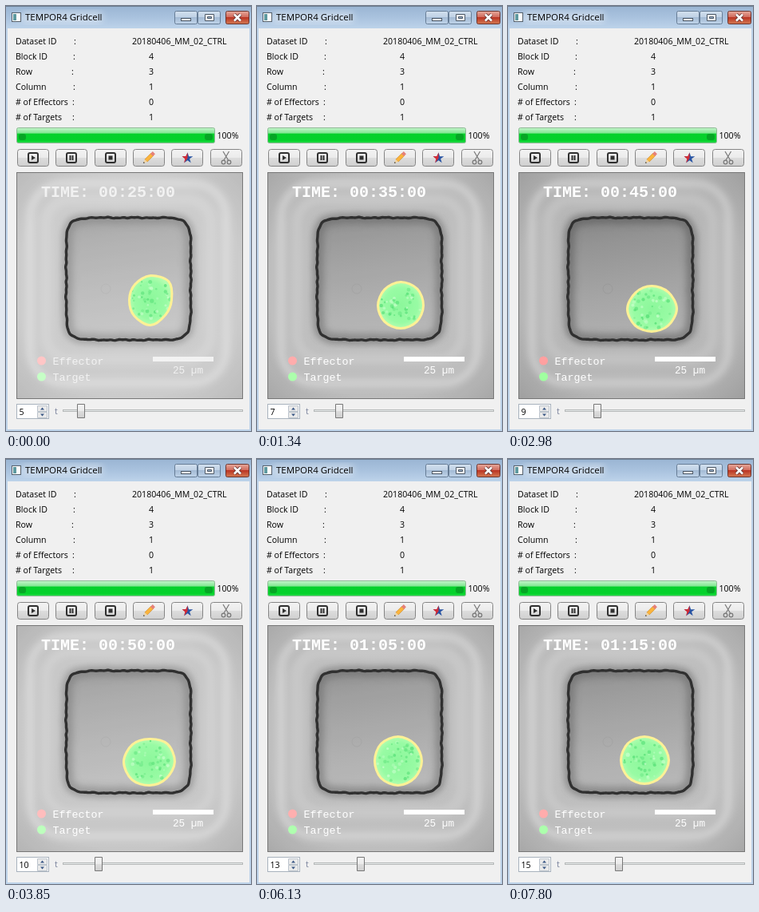
Write an HTML page that moves like this. It is 307x532 px and loops after 8000 ms.

```html
<!DOCTYPE html>
<html lang="en">
<head>
<meta charset="utf-8">
<title>Well viewer</title>
<style>
html, body { margin: 0; width: 100%; height: 100%; overflow: hidden; background: #f0f0f0; }
svg { display: block; width: 100%; height: 100%; }
.ui { font: 10.6px "Open Sans", "Noto Sans", sans-serif; fill: #000; }
.mono { font-family: "Liberation Mono", monospace; fill: #fff; }
.light { mix-blend-mode: soft-light; }
.icon { fill: none; stroke: #303030; stroke-width: 2; }
</style>
</head>
<body>
<svg viewBox="0 0 307 532" preserveAspectRatio="none">
  <defs>
    <linearGradient id="title" x2="0" y2="1">
      <stop offset="0" stop-color="#9ab5d3"/><stop offset=".5" stop-color="#a9c2de"/><stop offset="1" stop-color="#bdd3ea"/>
    </linearGradient>
    <linearGradient id="glass" x2="0" y2="1">
      <stop offset="0" stop-color="#d3e0ee"/><stop offset=".48" stop-color="#bfd1e5"/><stop offset=".5" stop-color="#a4bbd5"/><stop offset="1" stop-color="#c0d4e9"/>
    </linearGradient>
    <linearGradient id="close" x2="0" y2="1">
      <stop offset="0" stop-color="#e6a99c"/><stop offset=".48" stop-color="#d0695a"/><stop offset=".5" stop-color="#bb3524"/><stop offset="1" stop-color="#d47a52"/>
    </linearGradient>
    <linearGradient id="button" x2="0" y2="1">
      <stop offset="0" stop-color="#f3f3f3"/><stop offset=".49" stop-color="#ebebeb"/><stop offset=".5" stop-color="#dddddd"/><stop offset="1" stop-color="#cfcfcf"/>
    </linearGradient>
    <linearGradient id="bar" x2="0" y2="1">
      <stop offset="0" stop-color="#c4f5cb"/><stop offset=".36" stop-color="#7ee68f"/><stop offset=".38" stop-color="#06d02c"/><stop offset=".85" stop-color="#04d22b"/><stop offset="1" stop-color="#2fdc50"/>
    </linearGradient>
    <radialGradient id="field" cx=".5" cy=".5" r=".72">
      <stop offset="0" stop-color="#bcbcbc"/><stop offset=".7" stop-color="#b6b6b6"/><stop offset="1" stop-color="#9e9e9e"/>
    </radialGradient>
    <linearGradient id="floor" x2=".15" y2="1">
      <stop offset="0" stop-color="#858585"/><stop offset=".25" stop-color="#949494"/><stop offset=".7" stop-color="#a6a6a6"/><stop offset="1" stop-color="#b0b0b0"/>
    </linearGradient>
    <radialGradient id="body">
      <stop offset="0" stop-color="#8cf79b"/><stop offset=".75" stop-color="#98fba4"/><stop offset="1" stop-color="#b4fdb0"/>
    </radialGradient>
    <filter id="soft" x="-20%" y="-20%" width="140%" height="140%"><feGaussianBlur stdDeviation="4.500"/></filter>
    <filter id="edge"><feGaussianBlur stdDeviation=".7"/></filter>
    <clipPath id="frame"><rect x="14" y="209" width="282" height="282"/></clipPath>
    <clipPath id="inside"><path class="well"/></clipPath>
    <clipPath id="membrane"><path class="cell"/></clipPath>
  </defs>

  <rect width="307" height="532" fill="#bdd3ea"/>
  <rect width="307" height="28" fill="url(#title)"/>
  <path d="M0 .5H307" stroke="#6d7f92"/>
  <rect x="18" y="7" width="104" height="14" rx="7" fill="#fff" opacity=".4" filter="url(#soft)"/>
  <rect x="2" y="28" width="303" height="502" fill="#f0f0f0"/>
  <rect x="7.500" y="8.500" width="11" height="11" fill="#fff" stroke="#56616c"/>
  <path d="M9 10h4v8h-4z" fill="#5f9aa0"/>
  <text x="24" y="18" class="ui" style="font-size:11.500px">TEMPOR4 Gridcell</text>
  <g stroke="#667c95">
    <rect x="211.500" y="6.500" width="28" height="16" rx="2" fill="url(#glass)"/>
    <rect x="240.500" y="6.500" width="28" height="16" rx="2" fill="url(#glass)"/>
    <rect x="275.500" y="6.500" width="29" height="16" rx="2" fill="url(#close)" stroke="#6c3630"/>
  </g>
  <g fill="#fff" stroke="#4a5664">
    <rect x="219.500" y="15.500" width="12" height="3"/>
    <path d="M249.500 10.500h11v8h-11zM252.500 13.500h5v2h-5z" fill-rule="evenodd"/>
  </g>
  <path d="M286 10.500l8 8m0-8l-8 8" stroke="#683a38" stroke-width="4.500"/>
  <path d="M286 10.500l8 8m0-8l-8 8" stroke="#fff" stroke-width="2.500"/>

  <g id="rows" class="ui"></g>

  <rect x="13.500" y="152.500" width="248" height="19" rx="2" fill="url(#bar)" stroke="#8fb996"/>
  <g fill="#087d20" opacity=".5" filter="url(#edge)">
    <rect x="16" y="160" width="9" height="8" rx="3"/><rect x="249" y="160" width="10" height="8" rx="3"/>
  </g>
  <text x="264.500" y="166" class="ui">100%</text>

  <g id="buttons" fill="url(#button)" stroke="#858585"></g>
  <g class="icon">
    <rect x="28" y="184" width="12" height="12" rx="2"/>
    <rect x="76" y="184" width="12" height="12" rx="2"/>
    <rect x="125" y="184" width="12" height="12" rx="2"/>
    <path d="M80.500 187v6m3-6v6"/>
  </g>
  <path d="M32 187l5 3l-5 3zM128.500 187.500h5v5h-5z" fill="#303030"/>
  <g transform="translate(179 190) rotate(-45)">
    <path d="M-5-2.200H6V2.200H-5z" fill="#fbb43c" stroke="#c98524" stroke-width=".6"/>
    <path d="M5-2.200H9V2.200H5z" fill="#e58078"/>
    <path d="M-5-2.200L-10 0L-5 2.200z" fill="#f3d5a1"/><path d="M-8-1L-10 0L-8 1z" fill="#333"/>
  </g>
  <path id="star" fill="#2954a3"/>
  <path d="M227.500 190.500l-4.300 6l1-5.200l-3.700-3l4.700-.3l2.300-4.500z" fill="#d32c36"/>
  <g fill="none" stroke="#777" stroke-width="1.200">
    <path d="M272 182l6.500 11m1-11l-6.500 11"/><circle cx="272.500" cy="195.500" r="2.300"/><circle cx="279.500" cy="195.500" r="2.300"/>
  </g>

  <rect x="13.500" y="208.500" width="283" height="283" fill="#aaa" stroke="#777"/>
  <g clip-path="url(#frame)">
    <g style="isolation:isolate">
      <rect x="14" y="209" width="282" height="282" fill="url(#field)"/>
      <g fill="none" filter="url(#soft)">
        <rect x="30" y="222" width="246" height="250" rx="42" stroke="#e4e4e4" stroke-width="9" opacity=".5"/>
        <rect x="50" y="242" width="207" height="200" rx="30" stroke="#d8d8d8" stroke-width="12" opacity=".35"/>
        <path class="well" stroke="#5a5a5a" stroke-width="11" opacity=".6"/>
      </g>
      <path class="well" fill="url(#floor)"/>
      <g clip-path="url(#inside)">
        <path class="well" fill="none" stroke="#555" stroke-width="16" opacity=".5" filter="url(#soft)"/>
      </g>
      <circle cx="125" cy="354" r="6" fill="none" stroke="#888" opacity=".3"/>
      <rect id="glow" class="light" x="14" y="209" width="282" height="282" fill="#fff"/>
    </g>
    <path class="well" fill="none" stroke="#303030" stroke-width="3.400" filter="url(#edge)"/>
    <path class="cell" fill="url(#body)"/>
    <g id="spots" clip-path="url(#membrane)" filter="url(#edge)"></g>
    <path class="cell" fill="none" stroke="#fff196" stroke-width="3" stroke-linejoin="round"/>
    <circle id="effector" cx="44.500" cy="444" r="5.500"/>
    <circle id="target" cx="44.500" cy="464" r="5.500"/>
    <g id="labels" class="mono">
      <text id="clock" x="44" y="239" font-size="20" font-weight="700"></text>
      <g font-size="13.330">
        <text x="58.500" y="449">Effector</text><text x="58.500" y="469">Target</text>
        <text x="209" y="459.500" font-size="12.700">25 µm</text>
      </g>
      <rect x="184" y="439" width="76" height="6"/>
    </g>
  </g>

  <rect x="13.500" y="498.500" width="40" height="18" fill="#fff" stroke="#a8b2bd"/>
  <path d="M39.500 500.500h12v7h-12zM39.500 508.500h12v7h-12z" fill="#eaeaea" stroke="#bcc4cc"/>
  <path d="M43 505.500l2.500-3l2.500 3zM43 510.500l2.500 3l2.500-3z" fill="#3d5a87"/>
  <text id="count" x="16.500" y="512" class="ui"></text>
  <text x="61" y="511" class="ui" style="fill:#78809a">t</text>
  <rect x="71.500" y="505.500" width="225" height="2" fill="#e7eaea" stroke="#b5b8b8"/>
  <path id="thumb" d="M-4.500-8.500h9v17h-9z" fill="url(#button)" stroke="#777" stroke-linejoin="round"/>
</svg>
<script>
const $ = id => document.getElementById(id);
const setPath = (name, d) => document.querySelectorAll('.' + name).forEach(p => p.setAttribute('d', d));
const range = (n, fn) => Array.from({ length: n }, (_, i) => fn(i));

const rows = [
  ['Dataset ID', 85, '20180406_MM_02_CTRL', 158], ['Block ID', 84, '4'], ['Row', 82, '3'],
  ['Column', 84, '1'], ['# of Effectors', 83, '0'], ['# of Targets', 83, '1']
];
$('rows').innerHTML = rows.map(([label, colon, value, x = 179], i) => {
  const cell = (left, text) => `<text x="${left}" y="${48 + 19 * i}">${text}</text>`;
  return cell(12, label) + cell(colon, ':') + cell(x, value);
}).join('');

$('buttons').innerHTML = range(6, i =>
  `<rect x="${Math.round(14 + 48.3 * i) + .5}" y="179.5" width="39" height="21" rx="3"/>`).join('');

$('star').setAttribute('d', 'M' + range(10, i => {
  const r = i % 2 ? 2.7 : 7.2, a = i * Math.PI / 5 - Math.PI / 2;
  return `${227.5 + r * Math.cos(a)} ${190.5 + r * Math.sin(a)}`;
}).join('L') + 'z');

// Rounded square with a slightly ragged rim
setPath('well', 'M' + range(360, i => {
  const a = i * Math.PI / 180, c = Math.cos(a), s = Math.sin(a);
  const r = (Math.abs(c / 78) ** 8 + Math.abs(s / 76.5) ** 8) ** (-1 / 8)
    + .3 * Math.sin(29 * a) + .3 * Math.sin(53 * a + 1) + .3 * Math.sin(13 * a + 2);
  return `${(153.5 + r * c).toFixed(1)} ${(341.5 + r * s).toFixed(1)}`;
}).join('L') + 'z');

// step: centre x, centre y, then radii every 45 degrees clockwise from the right
const shapes = {
  5: [181, 368, 28, 28, 33, 30, 28, 29, 32, 34],
  7: [180, 375, 30, 30, 30, 30, 30, 30, 31, 31],
  8: [180, 377, 32, 31, 30, 31, 31, 29, 30, 32],
  9: [180, 379, 33, 31, 30, 31, 32, 30, 30, 31],
  10: [180, 379, 33, 31, 31, 33, 34, 32, 30, 33],
  13: [177, 378, 31, 31, 32, 32, 31, 32, 32, 31],
  15: [171, 377, 32, 31, 31, 31, 31, 31, 31, 31]
};
const light = { 5: .65, 6: .4, 7: .2, 8: .75, 9: 0, 10: .5, 11: .35, 12: .3, 13: .25, 14: .2, 15: .2 };
const starts = [0, 600, 1340, 2240, 2980, 3850, 4610, 5350, 6130, 7020, 7800];

function shapeAt(step) {
  const keys = Object.keys(shapes).map(Number);
  const to = keys.find(k => k >= step), from = keys.filter(k => k <= step).pop();
  const f = to === from ? 0 : (step - from) / (to - from);
  return shapes[from].map((v, i) => v + (shapes[to][i] - v) * f);
}

function smoothLoop(points) {
  const n = points.length, at = i => points[(i + n) % n];
  return `M${at(0)}` + points.map((p, i) => {
    const q = at(i + 1), before = at(i - 1), after = at(i + 2);
    const c1 = p.map((v, k) => v + (q[k] - before[k]) / 6);
    const c2 = q.map((v, k) => v - (after[k] - p[k]) / 6);
    return `C${c1} ${c2} ${q}`;
  }).join('') + 'z';
}

function random(seed) {
  return () => (seed = seed * 16807 % 2147483647) / 2147483647;
}

function draw(step) {
  const [cx, cy, ...radii] = shapeAt(step);
  setPath('cell', smoothLoop(radii.map((r, i) => {
    const a = i * Math.PI / 4;
    return [cx + (r - 1.5) * Math.cos(a), cy + (r - 1.5) * Math.sin(a)];
  })));

  const rnd = random(step * 7919);
  $('spots').innerHTML = range(44, i => {
    const a = rnd() * 2 * Math.PI, r = 26 * Math.sqrt(rnd());
    return `<circle cx="${cx + r * Math.cos(a)}" cy="${cy + r * Math.sin(a)}" r="${1 + 1.6 * rnd()}"
      fill="${i % 3 ? '#58e078' : '#c8ffcc'}" opacity="${.3 + .5 * rnd()}"/>`;
  }).join('');

  const glow = light[step], tint = 160 + 58 * glow;
  $('glow').setAttribute('opacity', glow);
  $('effector').setAttribute('fill', `rgb(255,${tint},${tint})`);
  $('target').setAttribute('fill', `rgb(${tint},255,${tint})`);
  $('labels').setAttribute('opacity', step === 5 ? .72 : 1);

  const pad = n => String(n).padStart(2, '0'), minutes = step * 5;
  $('clock').textContent = `TIME: ${pad(Math.floor(minutes / 60))}:${pad(minutes % 60)}:00`;
  $('count').textContent = step;
  $('thumb').setAttribute('transform', `translate(${Math.floor(94 + 4.5 * (step - 5))} 507)`);
}

let shown;
function tick() {
  const t = performance.now() % 8000;
  const step = 4 + starts.filter(s => s <= t).length;
  if (step !== shown) draw(shown = step);
  requestAnimationFrame(tick);
}
tick();
</script>
</body>
</html>
```
